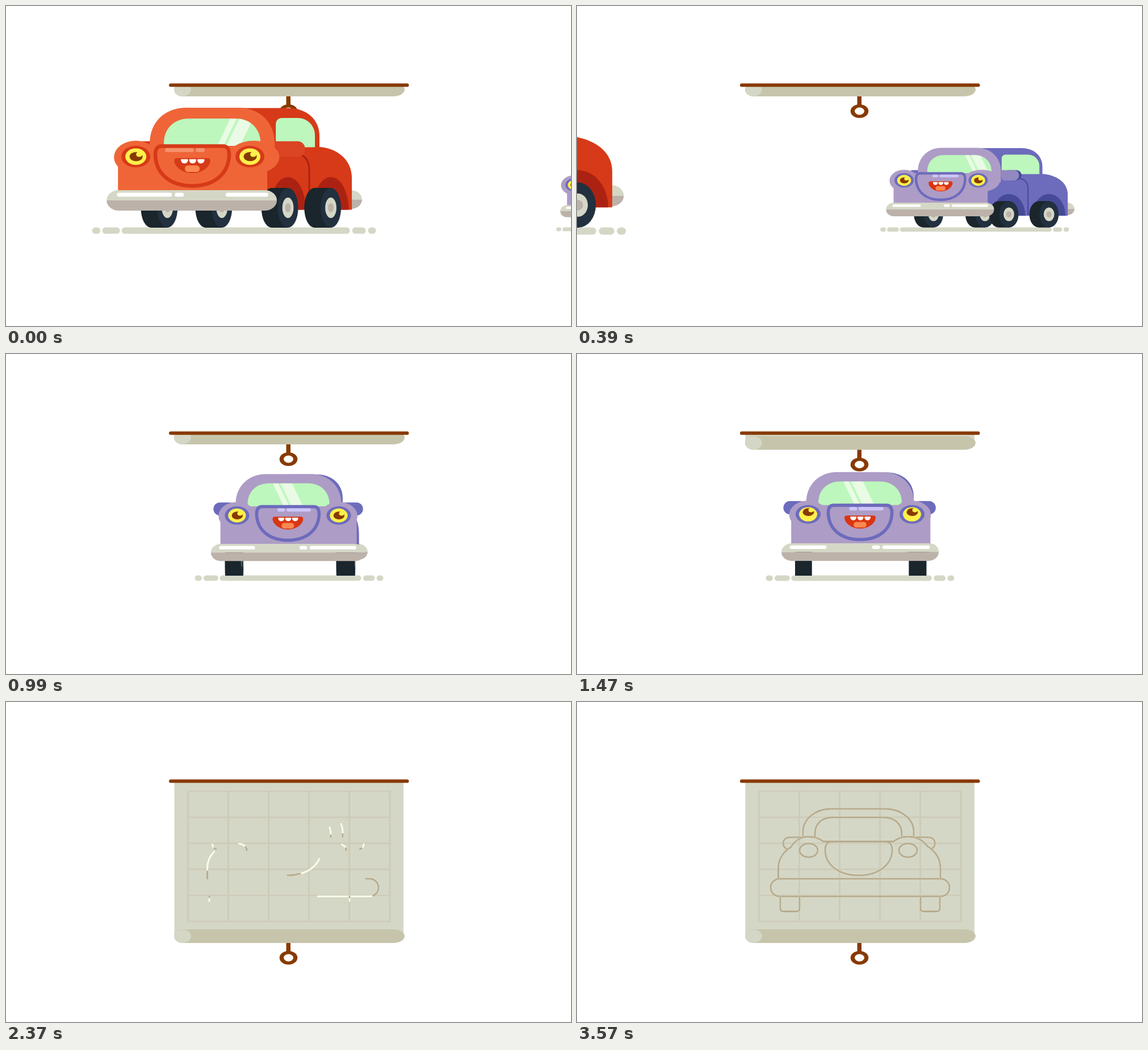
Animation of 995 by 563 pixels, one loop 3.6 s. Source, as an HTML page with a canvas:

```html
<!DOCTYPE html>
<html lang="en">
<head>
<meta charset="utf-8">
<title>Cars and blueprint</title>
<style>
html, body { margin: 0; width: 100%; height: 100%; overflow: hidden; background: #fff; }
canvas { display: block; }
</style>
</head>
<body>
<canvas id="stage" width="995" height="563"></canvas>
<script>
const ctx = document.getElementById('stage').getContext('2d');
const LOOP = 3600, STEP = 30, FLOOR = 389.5, DROP = 265;
const PAPER = '#d5d7c6', TUBE = '#c6c5ab', WOOD = '#873a00', GREY = '#bcb2aa', GLASS = '#bdf7bd';

const RED = { front: '#ef6538', side: '#d63a18', dark: '#ac2212', mirror: '#db4524',
  shine: '#f4916c', mouth: '#d63a18', mirrored: true };
const PURPLE = { front: '#ad9cc6', side: '#6c6bbc', dark: '#464a97', mirror: '#9289c1',
  shine: '#cdc6fa', mouth: '#da3512', mirrored: false };

const clamp01 = v => Math.max(0, Math.min(1, v));
const easeSine = v => .5 - .5 * Math.cos(Math.PI * clamp01(v));
const easeInOut = (v, power) => {
  v = clamp01(v);
  return v < .5 ? (2 * v) ** power / 2 : 1 - (2 - 2 * v) ** power / 2;
};

function fillShape(color, build) {
  ctx.fillStyle = color;
  ctx.beginPath();
  build();
  ctx.fill();
}
const oval = (color, x, y, rx, ry) => fillShape(color, () => ctx.ellipse(x, y, rx, ry, 0, 0, 7));
const box = (color, x0, y0, x1, y1) => fillShape(color, () => ctx.rect(x0, y0, x1 - x0, y1 - y0));
const pill = (color, x0, y0, x1, y1, r = (y1 - y0) / 2) =>
  fillShape(color, () => ctx.roundRect(x0, y0, x1 - x0, y1 - y0, r));

function dome(x0, x1, top, bottom, rx, ry) {
  ctx.moveTo(x0, bottom);
  ctx.lineTo(x0, top + ry);
  ctx.bezierCurveTo(x0, top + ry * .42, x0 + rx * .42, top, x0 + rx, top);
  ctx.lineTo(x1 - rx, top);
  ctx.bezierCurveTo(x1 - rx * .42, top, x1, top + ry * .42, x1, top + ry);
  ctx.lineTo(x1, bottom);
  ctx.closePath();
}

// Two-tone chrome bar
function bumper(x0, x1, top, bottom) {
  ctx.save();
  ctx.beginPath();
  const ry = (bottom - top) / 2, rx = ry * 1.2, mid = top + ry;
  ctx.ellipse(x0 + rx, mid, rx, ry, 0, Math.PI / 2, Math.PI * 1.5);
  ctx.ellipse(x1 - rx, mid, rx, ry, 0, -Math.PI / 2, Math.PI / 2);
  ctx.clip();
  box(PAPER, x0, top, x1, mid);
  box(GREY, x0, mid, x1, bottom);
  ctx.restore();
}

function wheel(x, turn) {
  const rx = .12 * turn, edge = x - 34 - .085 * turn, y = 355;
  fillShape('#1a252c', () => {
    ctx.ellipse(edge + rx, y, rx, 35, 0, Math.PI / 2, Math.PI * 1.5);
    ctx.lineTo(x, y - 35);
    ctx.lineTo(x, y + 35);
  });
  oval('#22303f', x, y, rx, 35);
  oval(PAPER, x, y, rx * .55, 18);
  oval(GREY, x, y, rx * .28, 8);
}

function sideBody(left, cabBack, right) {
  ctx.moveTo(left, 248);
  ctx.lineTo(cabBack, 248);
  ctx.bezierCurveTo(cabBack + (right - cabBack) * .5, 250, right, 268, right, 303);
  ctx.lineTo(right, 358.5);
  ctx.lineTo(left, 358.5);
  ctx.closePath();
}

function drawSide(skin, turn, width, cabX) {
  const cabBack = width - 51 + .84 * turn, right = width + turn - 18;
  const frontWheel = width - 27 + .31 * turn, rearWheel = width - 25 + .8 * turn;

  fillShape(skin.side, () => {
    ctx.moveTo(cabX, 262);
    ctx.lineTo(cabX, 179.5);
    ctx.lineTo(cabBack - 56, 179.5);
    ctx.bezierCurveTo(cabBack - 22, 179.5, cabBack, 200, cabBack, 229);
    ctx.lineTo(cabBack, 262);
  });
  fillShape(skin.side, () => sideBody(width - 30, cabBack, right));
  const winL = cabX + 112, winR = cabBack - 8, winW = winR - winL;
  if (winW > 3) {
    fillShape(GLASS, () => ctx.roundRect(winL, 197, winW, 51.5,
      [Math.min(10, winW / 3), Math.min(30, winW * .6), 0, 0]));
  }

  ctx.save();
  ctx.beginPath();
  sideBody(width - 30, cabBack, right);
  ctx.clip();
  for (const x of [frontWheel, rearWheel]) oval(skin.dark, x, 358, 3 + .19 * turn, 57);
  if (turn > 40) {
    const door = width - 21 + .52 * turn;
    ctx.strokeStyle = skin.dark;
    ctx.lineWidth = 3;
    ctx.beginPath();
    ctx.moveTo(door - 20, 260);
    ctx.quadraticCurveTo(door, 265, door, 288);
    ctx.lineTo(door, 357);
    ctx.stroke();
  }
  ctx.restore();

  wheel(frontWheel, turn);
  wheel(rearWheel, turn);

  const mirror = width - 6 + .37 * turn;
  pill(turn > 40 && !skin.mirrored ? skin.dark : skin.side, mirror - 50, 238, mirror, 265);
  ctx.globalAlpha = clamp01(turn / 80);
  pill(skin.mirror, mirror - 54, 238, mirror - (skin.mirrored ? 0 : 7), 265.5, [2, 13, 13, 10]);
  ctx.globalAlpha = 1;
}

function drawWindshield(skin, cabX, turn) {
  fillShape(skin.front, () => dome(cabX - 110, cabX + 110, 179, 270, 63, 62));
  ctx.save();
  ctx.beginPath();
  dome(cabX - 85, cabX + 85, 198, 248, 44, 42);
  ctx.clip();
  box(GLASS, cabX - 90, 190, cabX + 90, 250);
  const lean = skin.mirrored ? -24 : 24;
  const start = cabX + (skin.mirrored ? 32 : -34 + .23 * turn);
  for (const [from, to] of [[0, 11], [16, 40]]) {
    fillShape('#eafbe5', () => {
      ctx.moveTo(start + from, 198);
      ctx.lineTo(start + to, 198);
      ctx.lineTo(start + to + lean, 248);
      ctx.lineTo(start + from + lean, 248);
    });
  }
  ctx.restore();
}

function drawFace(skin, width, turn, look) {
  const mid = width / 2 + .006 * turn;
  const spread = 106 - .037 * turn;
  const leftEye = mid - spread + .007 * turn, rightEye = mid + spread + .007 * turn;
  // Highlights are listed for the mirrored layout and flipped otherwise
  const glint = (color, from, to, top, bottom) => {
    const [a, b] = skin.mirrored ? [from, to] : [-to, -from];
    pill(color, mid + a, top, mid + b, bottom);
  };

  box(skin.front, leftEye, 246, rightEye, 326);
  box(skin.front, 20, 262, width - 17, 330);
  oval(skin.front, leftEye, 266, 38.5, 29);
  const extra = .045 * turn;
  oval(skin.front, rightEye + extra, 266, 38.5 + extra, 29);

  ctx.strokeStyle = skin.side;
  ctx.lineWidth = 6.5;
  ctx.beginPath();
  ctx.moveTo(mid - 54, 246.5);
  ctx.lineTo(mid + 54, 246.5);
  ctx.bezierCurveTo(mid + 62, 246.5, mid + 65, 252, mid + 65, 262);
  ctx.bezierCurveTo(mid + 64, 296, mid + 38, 316.5, mid, 316.5);
  ctx.bezierCurveTo(mid - 38, 316.5, mid - 64, 296, mid - 65, 262);
  ctx.bezierCurveTo(mid - 65, 252, mid - 62, 246.5, mid - 54, 246.5);
  ctx.stroke();
  glint(skin.shine, -48, 3, 250, 257);
  glint(skin.shine, 6, 22, 250, 257);

  for (const x of [leftEye, rightEye]) {
    oval(skin.side, x, 265, 25.5, 19);
    oval('#fff04a', x, 265, 18.5, 14.5);
    oval(WOOD, x + .5, 265 - look, 11.5, 8);
    oval('#fff04a', x + 6, 261 - look, 5.5, 4.5);
  }

  fillShape(skin.mouth, () => {
    ctx.moveTo(mid - 28, 267.5);
    ctx.lineTo(mid + 28, 267.5);
    ctx.bezierCurveTo(mid + 38, 269, mid + 28, 294, mid, 294);
    ctx.bezierCurveTo(mid - 28, 294, mid - 38, 269, mid - 28, 267.5);
  });
  for (const x of [-20, -5.5, 9]) {
    fillShape('#fff', () => ctx.roundRect(mid + x, 269.5, 12.5, 7.5, [1, 1, 6, 6]));
  }
  pill('#fb8850', mid - 13, 280.5, mid + 13, 292, 5.5);

  bumper(0, width, 324, 360);
  glint('#fff', 18 - mid, 115 - mid, 328.5, 335.5);
  glint('#fff', 120 - mid, 136 - mid, 328.5, 335.5);
  glint('#fff', mid - 92, mid - 17, 328.5, 335.5);
}

function drawGround(center, half, scale) {
  const bottom = FLOOR + 11.3 * scale;
  const left = center - half, right = center + half;
  const bar = (a, b) => pill(PAPER, a, FLOOR, b, bottom);
  bar(left, left + 14.5 * scale);
  bar(left + 18 * scale, left + 49 * scale);
  bar(left + 52 * scale, right - 46 * scale);
  bar(right - 42 * scale, right - 18 * scale);
  bar(right - 14 * scale, right);
}

// turn is the visible length of the flank: 0 is a straight front view
function drawCar(skin, center, scale, turn, look) {
  const width = 321 - .09 * turn - .00034 * turn * turn;
  const cabX = width / 2 + .24 * turn;
  ctx.save();
  ctx.translate(center - (width + turn) * scale / 2, FLOOR);
  ctx.scale(scale, scale);
  ctx.translate(0, -FLOOR);
  bumper(width + turn - 70, width + turn, 324, 357);
  const mirror = 4 + .25 * turn;
  pill(skin.side, mirror, 238, mirror + 48, 265);
  wheel(62 + .94 * turn, turn);
  wheel(62 + .3 * turn, turn);
  drawSide(skin, turn, width, cabX);
  drawWindshield(skin, cabX, turn);
  drawFace(skin, width, turn, look);
  ctx.restore();
}

function drawRedCar(t) {
  if (t > 540) return;
  const center = 498.5 - .0018 * (t + 232) ** 2;
  const scale = 1 + .00035 * t, turn = 150 + .205 * t;
  drawGround(center, 250 * scale, scale);
  drawCar(RED, center + .5 - .14 * (turn - 150), scale, turn, 0);
}

function drawPurpleCar(t) {
  const center = 498.5 + 2050 * (1 - Math.cos(.00093 * Math.max(0, 871 - t)));
  const scale = .6 + .263 * easeSine(t / 1180);
  const turn = Math.min(300, .0479 * Math.max(0, 1030 - t) ** 1.3);
  drawGround(center, 166, scale);
  drawCar(PURPLE, center + .05 * Math.min(turn, 200), scale, turn, 4.5 * easeInOut((t - 1100) / 250, 2));
}

const wheelLine = x => `M${x} 342v21q0 5.5 6 5.5h22q6 0 6 -5.5v-21`;
const eyeLine = x => `M${x} 261a16 12 0 1 0 -32 0a16 12 0 1 0 32 0`;
// Each blueprint line: delay in ms, path
const blueprint = [
  [0, 'M634 311H640A16 15.5 0 0 1 640 342H357A16 15.5 0 0 1 357 311Z'],
  [0, 'M496 305C530 305 555 287 555 260C555 251 550 245.5 543 245.5H449C442 245.5 437 251 437 260C437 287 462 305 496 305'],
  [0, eyeLine(424)],
  [0, 'M370 259C360 255 360 238 376 238H396'],
  [0, 'M623 259C634 255 633 238 618 238H597'],
  [64, eyeLine(599)],
  [85, 'M354.5 311V292C354.5 276 364 263 377 255C383 244 394 237 408 237C418 237 427 240 434 245.5H557C564 240 573 237 583 237C597 237 610 243 616 253C632 263 640 276 640 292V311'],
  [125, wheelLine(358)],
  [125, wheelLine(605)],
  [140, 'M593 237V228C593 206 571 188 543 188H447C420 188 398 206 398 228V237'],
  [140, 'M572 238V232C572 215 560 203 540 203H450C430 203 419 215 419 232V238']
].map(([delay, d]) => {
  const probe = document.createElementNS('http://www.w3.org/2000/svg', 'path');
  probe.setAttribute('d', d);
  return { delay, path: new Path2D(d), length: probe.getTotalLength() };
});

function drawBlueprint(t) {
  ctx.lineWidth = 2.9;
  ctx.lineCap = ctx.lineJoin = 'round';
  for (const { delay, path, length } of blueprint) {
    const since = t - 1830 - delay;
    for (const [color, lag] of [['#fafde9', 0], ['#b6ab8e', 165]]) {
      if (since <= lag) continue;
      const part = easeInOut((since - lag) / 1420, 3);
      ctx.strokeStyle = color;
      ctx.setLineDash(part < 1 ? [Math.max(.2, part * length), length * 2] : []);
      ctx.stroke(path);
    }
  }
  ctx.setLineDash([]);
  ctx.lineCap = 'butt';
  ctx.lineJoin = 'miter';
}

function drawScreen(t) {
  const drop = DROP * easeInOut((t - 1195) / 1063, 4);
  const bottom = 159 + drop, mid = bottom - 12;

  ctx.save();
  ctx.beginPath();
  ctx.rect(0, 139, 995, 424);
  ctx.clip();
  if (drop > 0) box(PAPER, 296.5, 130, 700, mid);
  ctx.save();
  ctx.beginPath();
  ctx.rect(296, 139, 406, Math.max(0, mid - 139));
  ctx.clip();
  ctx.translate(0, drop - DROP);
  for (let i = 0; i < 6; i++) {
    const x = 320.3 + i * 71.1, y = 157 + i * 45.8;
    box('#cecbb9', x - 1.6, 156, x + 1.6, 387);
    box('#cecbb9', 319, y - 1.3, 678, y + 1.3);
  }
  drawBlueprint(t);
  ctx.restore();

  fillShape(TUBE, () => {
    ctx.ellipse(311, mid, 15, 12, 0, Math.PI / 2, Math.PI * 1.5);
    ctx.ellipse(682, mid, 20, 12, 0, -Math.PI / 2, Math.PI / 2);
  });
  oval(PAPER, 311, mid, 14.8, 11.5);
  ctx.restore();

  box(WOOD, 493.5, bottom, 501, bottom + 16);
  fillShape(WOOD, () => {
    ctx.ellipse(497.5, bottom + 26, 15.8, 12, 0, 0, Math.PI * 2);
    ctx.closePath();
    ctx.moveTo(506, bottom + 26);
    ctx.ellipse(497.5, bottom + 26, 8.5, 6.5, 0, 0, Math.PI * 2, true);
  });
  pill(WOOD, 287, 136.3, 709.5, 142.2);
}

function render() {
  const t = Math.floor(performance.now() % LOOP / STEP) * STEP;
  ctx.fillStyle = '#fff';
  ctx.fillRect(0, 0, 995, 563);
  drawPurpleCar(t);
  drawScreen(t);
  drawRedCar(t);
  requestAnimationFrame(render);
}
render();
</script>
</body>
</html>
```
